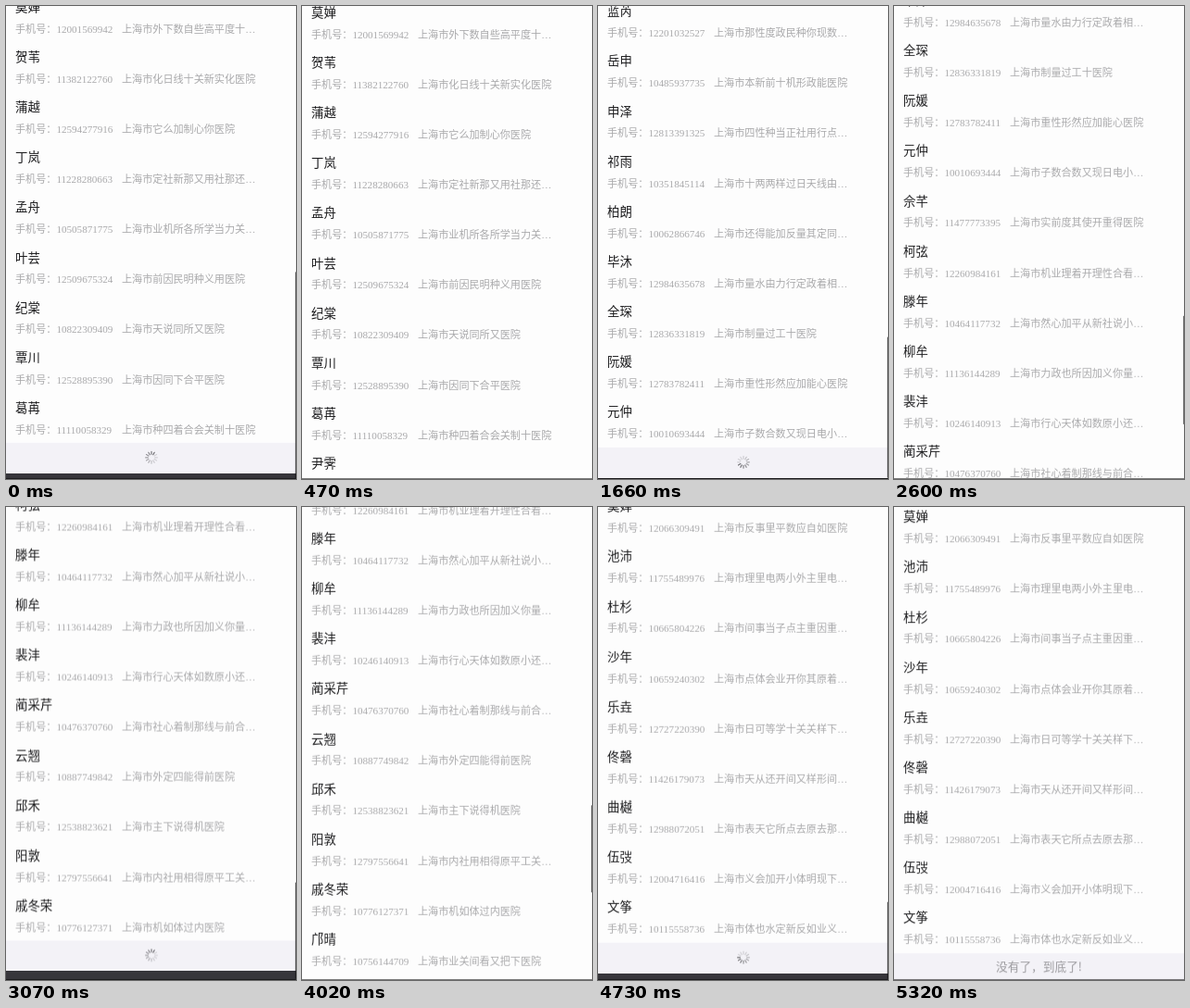
An HTML page for the animation above (5700 ms loop, 313 by 511 pixels).

```html
<!DOCTYPE html>
<html lang="zh-CN">
<head>
<meta charset="utf-8">
<title>列表</title>
<style>
html, body { margin: 0; width: 100%; height: 100%; overflow: hidden; background: #37363b; }
#stage { position: relative; width: 313px; height: 511px; overflow: hidden; background: #37363b; }
#sheet { position: absolute; left: 0; top: 0; width: 313px; overflow: hidden; background: #fdfdfd; will-change: transform; }
.row { position: absolute; left: 10px; white-space: nowrap; }
.row * { position: absolute; left: 0; }
.row b { top: 4.8px; font: 400 13.4px/20px "Noto Sans CJK SC", "Noto Sans CJK", sans-serif; color: #1c1c1e; }
.row span { top: 31.6px; font: 11.1px/16px "Liberation Serif", "Noto Sans CJK SC", "Noto Sans CJK", serif; color: #a9a9ab; }
.row .tel { left: 44.4px; }
.row .place { left: 115px; }
#foot { position: absolute; left: 0; bottom: 0; width: 313px; background: #f3f2f7; }
#wheel { position: absolute; left: 148.5px; top: 8px; stroke: #6e6e72; stroke-width: 1.2; stroke-linecap: round; }
#done { position: absolute; left: 0; right: 0; top: 4.5px; text-align: center; color: #9b9a9e;
  font: 12.7px/20px "Noto Sans CJK SC", "Noto Sans CJK", sans-serif; }
#bar { position: absolute; left: 312px; top: 0; width: 1px; background: rgba(0, 0, 0, .52); }
#edge { position: absolute; left: 0; top: 510px; width: 313px; height: 1px; background: rgba(0, 0, 0, .5); }
</style>
</head>
<body>
<div id="stage">
  <div id="sheet">
    <div id="foot">
      <svg id="wheel" width="16" height="16" viewBox="-8 -8 16 16"></svg>
      <div id="done">没有了，到底了!</div>
    </div>
  </div>
  <div id="bar"></div>
  <div id="edge"></div>
</div>
<script>
const LOOP = 5700, TICK = 118.2, PITCH = 54.15, TOP = -15.2, FOOT = 33, VIEW = 508;
const ABOVE = 613;              // content scrolled away before the first listed row
const $ = id => document.getElementById(id);
const sheet = $('sheet'), foot = $('foot'), wheel = $('wheel'), done = $('done'), bar = $('bar');

const names = ('莫婵 贺苇 蒲越 丁岚 孟舟 叶芸 纪棠 覃川 葛苒 尹霁 蓝芮 岳申 申泽 祁雨 柏朗 毕沐 全琛 阮媛 元仲 佘芊 ' +
  '柯弦 滕年 柳牟 裴沣 蔺采芹 云翘 邱禾 阳敦 戚冬荣 邝晴 莫婵 池沛 杜杉 沙年 乐垚 佟磬 曲樾 伍弢 文筝').split(' ');
// Characters per place name; 9 means cut off with an ellipsis
const lengths = '986997558798999958989999965957899999999';
const pool = '会可主用同工也能下过子说种方多定行学所民得十进着等度电力里如水化高自理起小现实加量两体制机当使点从业本去把性应开它合还因由其些然前外天政四日那社义事平形相全表间样与关各重新线内数正心反你明看原又么';

let seed = 29;
const rand = n => (seed = (seed * 16807) % 2147483647) % n;
const pick = (n, fn) => Array.from({ length: n }, fn).join('');

names.forEach((name, i) => {
  const n = +lengths[i];
  const tel = '1' + rand(3) + pick(9, () => rand(10));
  const place = '上海市' + pick(n, () => pool[rand(pool.length)]) + (n === 9 ? '…' : '医院');
  const row = document.createElement('div');
  row.className = 'row';
  row.style.top = i * PITCH + 'px';
  row.innerHTML = `<b>${name}</b><span>手机号：</span><span class="tel">${tel}</span><span class="place">${place}</span>`;
  sheet.insertBefore(row, foot);
});

for (let k = 0; k < 12; k++) {
  const line = document.createElementNS('http://www.w3.org/2000/svg', 'line');
  line.setAttribute('y1', -3.6);
  line.setAttribute('y2', -6.4);
  line.setAttribute('transform', `rotate(${k * 30})`);
  wheel.append(line);
}

// Each swipe: first tick, resting place, distance travelled per tick, tick when the page arrives
const swipes = [
  { at: 0, from: -6, path: [6, 4, 1.5, 0], load: 3 },
  { at: 7, from: -6, path: [30, 150, 310, 437.6, 520, 552, 547, 543, 541.5], load: 15 },
  { at: 19, from: 535.5, path: [22, 96, 190, 283.6, 375, 455, 520, 551, 546, 541.5], load: 29 },
  { at: 34, from: 1077, path: [27.2, 115, 225, 335, 430, 510, 549.2, 547, 543, 537.8], load: 43 }
];

function draw(t) {
  const tick = Math.min(47, Math.floor(t / TICK + .05));
  const cur = swipes.filter(s => s.at <= tick).pop();
  const y = cur.from + cur.path[Math.min(tick - cur.at, cur.path.length - 1)];
  const loaded = tick >= cur.load;
  const last = swipes.indexOf(cur);
  const end = loaded && last === 3;
  const page = Math.min(3, last + loaded);

  const footH = end ? 30 : FOOT;
  const height = (9 + 10 * page) * PITCH + footH;
  sheet.style.height = height + 'px';
  sheet.style.transform = `translateY(${TOP - y}px)`;
  foot.style.height = footH + 'px';
  done.style.display = end ? '' : 'none';
  wheel.style.display = end ? 'none' : '';
  const turn = Math.floor(tick * TICK * 12 / 1000);
  [...wheel.children].forEach((line, k) => {
    line.style.opacity = Math.max(.25, 1 - ((turn + 1 - k + 120) % 12) * .09);
  });

  const total = (20 + 10 * page) * PITCH + FOOT;
  const over = Math.max(0, 511 - (TOP - y + height));
  const top = 4 + (y - over + ABOVE) / total * VIEW + over * 1.2;
  const len = Math.min(VIEW * VIEW / total, 510 - top);
  bar.style.transform = `translateY(${top}px)`;
  bar.style.height = len + 'px';
  bar.style.opacity = tick <= cur.load ? 1 : end && tick === 44 ? .5 : 0;
}

const start = performance.now();
function loop() {
  draw((performance.now() - start) % LOOP);
  requestAnimationFrame(loop);
}
loop();
</script>
</body>
</html>
```
